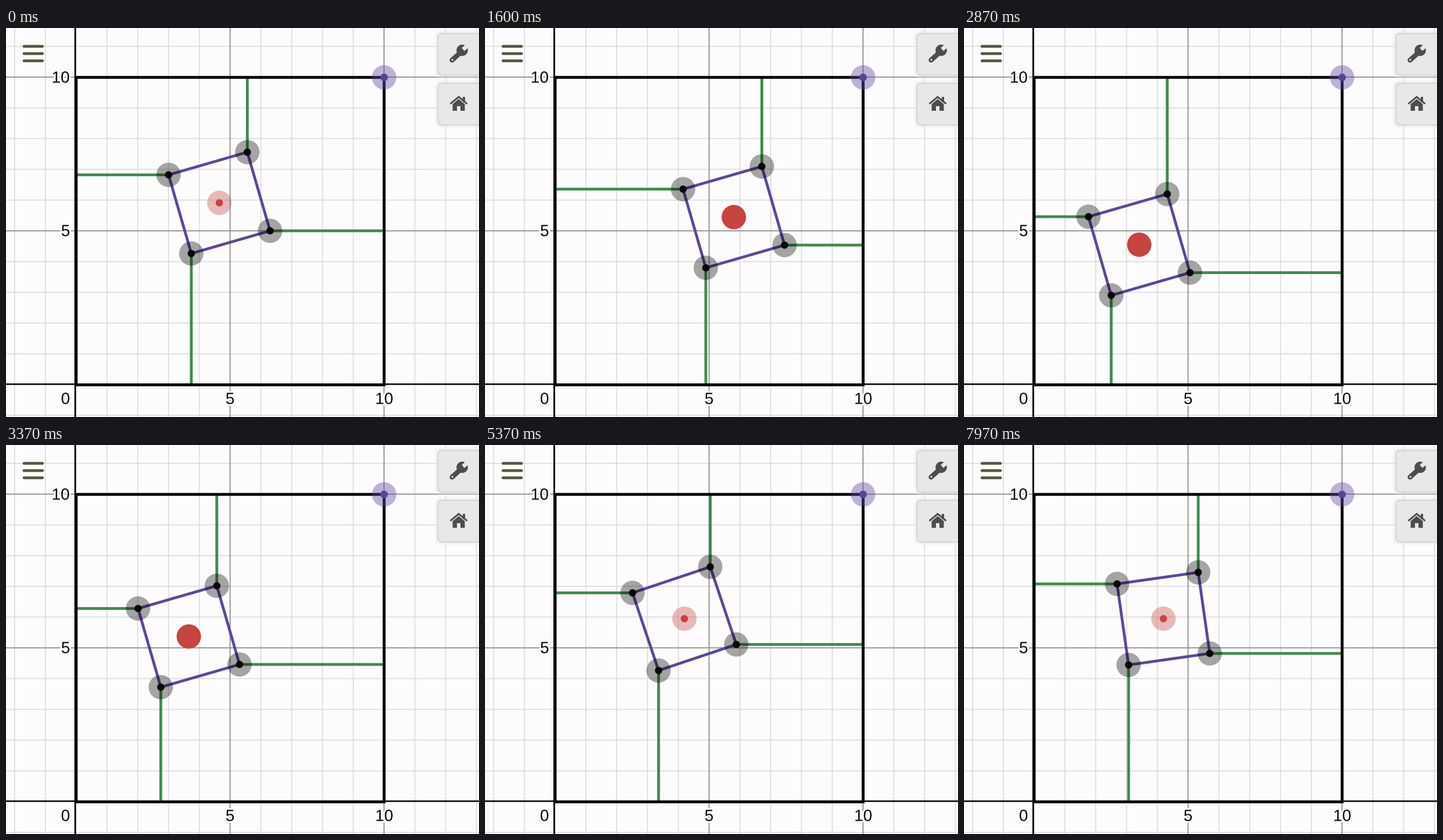
Write a matplotlib script that moves like this. It is 816 px wide and 672 px high and loops after 8000 ms.

```python
import numpy as np
import matplotlib.pyplot as plt
from matplotlib import patheffects
from matplotlib.animation import FuncAnimation
from matplotlib.patches import Circle, FancyBboxPatch, Polygon, Rectangle

W, H, DPI = 816, 672, 96
PT = 72 / DPI                      # points per pixel
FRAMES, STEP = 200, 40

PAPER, INK = "#fcfcfc", "#080808"
MINOR, MAJOR = "#d9d9db", "#8e8e88"
GREEN, PURPLE, RED = "#3f8b4c", "#5d479a", "#c74440"
BUTTON, ICON = "#e9e7ea", "#4e4c4c"

X0, Y0, X10, Y10 = 121, 616.4, 652.3, 85.3
UNIT = 53.12
RADIUS = 100

# time, centre x, centre y
DRAG = [(1050, 368, 302), (2130, 471.5, 358), (2870, 301.5, 374), (3850, 344, 300)]
# time, tilt in degrees
TURN = [(4900, 16.1), (6470, 25.8), (7970, 8.1)]
PRESS, RELEASE = 700, 4000

fig = plt.figure(figsize=(W / DPI, H / DPI), dpi=DPI, facecolor=PAPER)
ax = fig.add_axes([0, 0, 1, 1])
ax.set_xlim(0, W)
ax.set_ylim(H, 0)
ax.axis("off")


def line(xs, ys, color, width, z, cap="butt", **kw):
    return ax.plot(xs, ys, color=color, lw=width * PT, zorder=z,
                   solid_capstyle=cap, snap=False, **kw)[0]


def disc(x, y, r, color, z, alpha=1):
    return ax.add_patch(Circle((x, y), r, fc=color, ec="none", alpha=alpha, zorder=z))


def label(text, x, y, ha="right"):
    ax.text(x, y + 9.5, text, ha=ha, va="baseline", fontsize=28 * PT,
            family="Liberation Sans", color=INK, zorder=4,
            path_effects=[patheffects.withStroke(linewidth=6 * PT, foreground=PAPER)])


def smooth(keys, t):
    """Cubic curve through the keys, at rest at both ends."""
    k = np.array(keys, float)
    times, vals = k[:, 0], k[:, 1:]
    t = np.clip(t, times[0], times[-1])
    slope = np.zeros_like(vals)
    slope[1:-1] = (vals[2:] - vals[:-2]) / (times[2:] - times[:-2])[:, None]
    i = min(np.searchsorted(times, t, "right") - 1, len(times) - 2)
    d = times[i + 1] - times[i]
    u = (t - times[i]) / d
    return ((2 * u**3 - 3 * u**2 + 1) * vals[i] + (3 * u**2 - 2 * u**3) * vals[i + 1]
            + d * ((u**3 - 2 * u**2 + u) * slope[i] + (u**3 - u**2) * slope[i + 1]))


def draw_grid():
    for n in range(-2, 14):
        color, width, z = (MINOR, 1.5, 1) if n % 5 else (MAJOR, 1.8, 2)
        if n:
            x, y = X0 + UNIT * n, 616 - UNIT * n
            line([x, x], [0, H], color, width, z)
            line([0, W], [y, y], color, width, z)
    line([119.5, 119.5], [0, H], INK, 3, 3)
    line([0, W], [615.3, 615.3], INK, 2.6, 3)
    label("10", 110, 85)
    label("5", 110.5, 350)
    label("0", 110.5, 640)
    label("5", 386.5, 640, "center")
    label("10", 652.5, 640, "center")


def draw_box():
    ax.add_patch(Rectangle((X0, Y10), X10 - X0, Y0 - Y10, fill=False, ec=INK,
                           lw=5 * PT, snap=False, zorder=6))
    disc(X10, Y10, 21, "#6042a6", 7, 0.4)
    disc(X10, Y10, 6.5, "#5a4490", 8)


def button(y):
    def panel(grow, alpha, fc, ec):
        ax.add_patch(FancyBboxPatch(
            (745 - grow, y - grow), 90 + 2 * grow, 72 + 2 * grow, fc=fc, ec=ec,
            boxstyle=f"round,pad=0,rounding_size={8 + grow}", lw=1.5 * PT,
            alpha=alpha, zorder=9))
    for grow in (6, 4, 2):
        panel(grow, 0.22, "#e6e4ea", "none")
    panel(0, 1, BUTTON, "#cfcdd3")


def draw_controls():
    for y in (31.7, 44.2, 56.7):
        line([31, 63], [y, y], "#58563f", 4.8, 9, "round")
    button(9.5)
    button(95.5)
    # wrench
    line([769.5, 785], [55.5, 41.5], ICON, 8.5, 10, "round")
    disc(787, 38.5, 9.8, ICON, 10)
    line([788.5, 801], [37, 26.5], BUTTON, 7, 11)
    disc(770, 55, 1.6, BUTTON, 11)
    # house
    line([766.5, 781, 795.5], [131, 119, 131], ICON, 3, 10, solid_joinstyle="miter")
    ax.add_patch(Rectangle((787.8, 119), 4.2, 9, color=ICON, lw=0, zorder=10))
    body = [(770.5, 131.5), (781, 122.8), (791.5, 131.5), (791.5, 143), (784, 143),
            (784, 135), (778, 135), (778, 143), (770.5, 143)]
    ax.add_patch(Polygon(body, color=ICON, lw=0, zorder=10))


draw_grid()
draw_box()
draw_controls()

rays = [line([], [], GREEN, 4.8, 5) for _ in range(4)]
sides = line([], [], PURPLE, 4.8, 6, solid_joinstyle="round")
halos = [disc(0, 0, 21, "#000000", 7, 0.35) for _ in range(4)]
dots = [disc(0, 0, 6.3, INK, 8) for _ in range(4)]
grip = disc(0, 0, 21, RED, 7)
core = disc(0, 0, 6.3, RED, 8)


def update(i):
    t = (i + 0.5) * STEP           # middle of the frame's time slot
    cx, cy = smooth(DRAG, t)
    tilt = smooth(TURN, t)[0]
    # corners in order: top, left, bottom, right
    a = np.radians(45 + tilt + 90 * np.arange(4))
    xs, ys = cx + RADIUS * np.cos(a), cy - RADIUS * np.sin(a)
    ends = [(xs[0], Y10), (X0, ys[1]), (xs[2], Y0), (X10, ys[3])]
    for x, y, (ex, ey), ray, halo, dot in zip(xs, ys, ends, rays, halos, dots):
        ray.set_data([x, ex], [y, ey])
        halo.center = dot.center = (x, y)
    sides.set_data(np.append(xs, xs[0]), np.append(ys, ys[0]))
    grip.center = core.center = (cx, cy)
    grip.set_alpha(1 if PRESS <= t < RELEASE else 0.36)
    return [*rays, sides, *halos, *dots, grip, core]


anim = FuncAnimation(fig, update, frames=FRAMES, interval=STEP,
                     init_func=lambda: update(0), repeat=True, repeat_delay=0)
plt.show()
```
